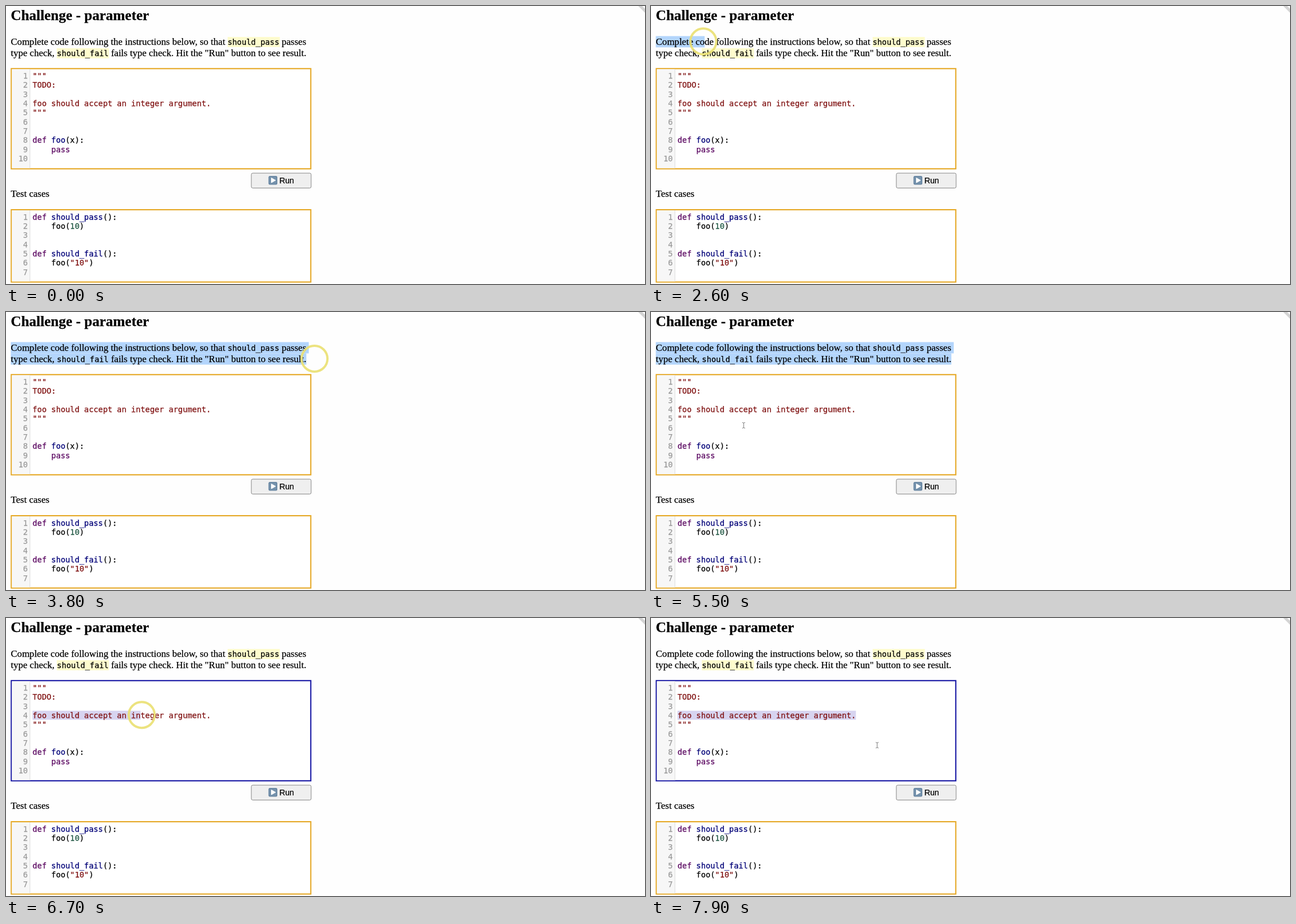
An HTML page for the animation above (8000 ms loop, 1133 by 494 pixels).

```html
<!DOCTYPE html>
<html lang="en">
<head>
<meta charset="utf-8">
<title>Challenge - parameter</title>
<style>
  html, body { margin: 0; width: 100%; height: 100%; overflow: hidden; background: #fefefe; }
  svg { display: block; width: 100%; height: 100%; }
  text {
    white-space: pre; font: 17.05px "Liberation Serif", serif;
    fill: currentColor; stroke: currentColor; stroke-width: .25px;
  }
  tspan { fill: currentColor; stroke: currentColor; }
  .title { font-size: 25.5px; font-weight: bold; }
  .code, .mono { font: 13.83px "DejaVu Sans Mono", monospace; }
  .num { color: #999; text-anchor: end; }
  .key { color: #5a0660; }
  .def { color: #000078; }
  .str { color: #7f1010; }
  .int { color: #1c5540; }
  .button { font: 14.2px "Liberation Sans", sans-serif; }
</style>
</head>
<body>
<svg viewBox="0 0 1133 494">
  <path d="M1121 0L1133 12V5L1128 0Z" fill="#d4d4d4"/>
  <text class="title" x="8.5" y="25.2">Challenge - parameter</text>
  <g fill="#fefccd">
    <rect x="393" y="55" width="92.5" height="18"/>
    <rect x="90" y="75" width="92.5" height="18"/>
  </g>
  <g fill="#b3d5fc">
    <rect id="selectTop" x="8.5" y="53.5" height="20"/>
    <rect id="selectBottom" x="8.5" y="73.5" height="20"/>
  </g>
  <text id="lineTop" x="8.5" y="68.6">Complete code following the instructions below, so that <tspan class="mono">should_pass</tspan> passes</text>
  <text id="lineBottom" x="8.5" y="88.6">type check, <tspan class="mono">should_fail</tspan> fails type check. Hit the "Run" button to see result.</text>

  <g id="solution"></g>

  <rect x="435" y="297" width="106" height="26.5" rx="2.5" fill="#efefef" stroke="#858585"/>
  <rect x="465.5" y="302" width="15.5" height="15.5" rx="2.5" fill="#5d7d9b"/>
  <rect x="466.5" y="303" width="13.5" height="13.5" rx="2" fill="#7592ac"/>
  <path d="M470.5 305.5V314L478 309.75Z" fill="#fff" stroke="#fff" stroke-linejoin="round"/>
  <text class="button" x="484.7" y="315">Run</text>
  <text x="8.5" y="339">Test cases</text>

  <g id="tests"></g>

  <path id="beam" d="M-2.5 -5Q0 -5 0 -3.5Q0 -5 2.5 -5M0 -3.5V3.5M-2.5 5Q0 5 0 3.5Q0 5 2.5 5" fill="none" stroke="#777"/>
  <circle id="ring" r="23" fill="none" stroke="#ebe176" stroke-width="4" opacity=".93"/>
</svg>
<script>
const LOOP = 8000, STEP = 100;
const ENTER = 300, PARA_PRESS = 2300, PARA_RELEASE = 4200, CODE_PRESS = 6300, CODE_RELEASE = 7700;
const LEFT = 8.5, CODE_X = 47, ROW = 16.33;
const IDLE = '#e5a722', FOCUSED = '#1111a2';
const $ = id => document.getElementById(id);
const span = (kind, text) => `<tspan class="${kind}">${text}</tspan>`;
const def = (name, args) => `${span('key', 'def')} ${span('def', name)}(${args}):`;

function drawEditor(id, top, height, rows) {
  const lines = rows.map((row, i) => {
    const y = top + 18.7 + i * ROW;
    return `<text class="code num" x="38.6" y="${y}">${i + 1}</text>
      <text class="code" x="${CODE_X}" y="${y}">${row}</text>`;
  });
  $(id).innerHTML = `
    <rect class="frame" x="9.4" y="${top + 1}" width="531" height="${height - 2}" fill="#fff" stroke="${IDLE}" stroke-width="2.1"/>
    <rect x="10.5" y="${top + 2}" width="32" height="${height - 4}" fill="#f7f7f7"/>
    <rect x="42" y="${top + 2}" width="1" height="${height - 4}" fill="#ddd"/>
    <rect class="selection" x="${CODE_X}" y="${top + 5.5 + 3 * ROW}" width="0" height="16" fill="#d7d4f0"/>
    ${lines.join('')}`;
}

drawEditor('solution', 110.3, 180, [
  span('str', '"""'), span('str', 'TODO:'), '',
  span('str', 'foo should accept an integer argument.'), span('str', '"""'),
  '', '', def('foo', 'x'), '    ' + span('key', 'pass'), ''
]);
drawEditor('tests', 361, 130.5, [
  def('should_pass', ''), `    foo(${span('int', '10')})`, '', '',
  def('should_fail', ''), `    foo(${span('str', '"10"')})`, ''
]);

const frame = document.querySelector('#solution .frame');
const codeSelection = document.querySelector('#solution .selection');
const todoLine = document.querySelectorAll('#solution .code:not(.num)')[3];

const smooth = k => k * k * (3 - 2 * k);
const slowDown = k => 1 - (1 - k) ** 2;

// Each move starts where the previous one ended; bend delays the vertical part.
const entry = { x: 519, y: 488 };
const moves = [
  { from: ENTER, to: 1350, x: 72, y: 181, ease: slowDown },
  { from: 1700, to: 2200, x: 10, y: 63, ease: smooth },
  { from: 2280, to: 3570, x: 547, y: 83, ease: smooth, bend: 4 },
  { from: PARA_RELEASE - STEP, to: 5000, x: 171, y: 203, ease: smooth },
  { from: 5400, to: 6100, x: 50, y: 174, ease: smooth },
  { from: 6365, to: 7300, x: 374, y: 171, ease: slowDown },
  { from: CODE_RELEASE - STEP, to: 7900, x: 401, y: 226, ease: smooth }
];

function pointerAt(t) {
  let { x, y } = entry;
  for (const move of moves) {
    const k = move.ease(Math.min(1, Math.max(0, (t - move.from) / (move.to - move.from))));
    x += (move.x - x) * k;
    y += (move.y - y) * k ** (move.bend || 1);
  }
  return { x, y };
}

// Selections end at the letter edge nearest to the pointer.
function edgesOf(text) {
  const edges = [text.getStartPositionOfChar(0).x];
  for (let i = 0; i < text.getNumberOfChars(); i++) edges.push(text.getEndPositionOfChar(i).x);
  return edges;
}
const nearest = (edges, x) => edges.reduce((a, b) => Math.abs(b - x) < Math.abs(a - x) ? b : a);
const topEdges = edgesOf($('lineTop')), bottomEdges = edgesOf($('lineBottom')), codeEdges = edgesOf(todoLine);
const setWidth = (rect, width) => rect.setAttribute('width', Math.max(0, width));

function draw(t) {
  const { x, y } = pointerAt(t);
  const pressed = t >= PARA_PRESS && t < PARA_RELEASE || t >= CODE_PRESS && t < CODE_RELEASE;
  for (const id of ['ring', 'beam']) $(id).setAttribute('transform', `translate(${x} ${y})`);
  $('ring').style.display = pressed ? '' : 'none';
  $('beam').style.display = pressed || t < ENTER ? 'none' : '';

  let topWidth = 0, bottomWidth = 0;
  if (t >= PARA_PRESS && t < CODE_PRESS) {
    const drag = pointerAt(Math.min(t, PARA_RELEASE - STEP));
    const onSecondLine = drag.y > 73.5;
    topWidth = onSecondLine ? 528.3 : nearest(topEdges, drag.x) - LEFT;
    bottomWidth = onSecondLine ? nearest(bottomEdges, drag.x) - LEFT : 0;
  }
  setWidth($('selectTop'), topWidth);
  setWidth($('selectBottom'), bottomWidth);

  const focused = t >= CODE_PRESS;
  frame.setAttribute('stroke', focused ? FOCUSED : IDLE);
  const drag = pointerAt(Math.min(t, CODE_RELEASE - STEP));
  setWidth(codeSelection, focused ? nearest(codeEdges, drag.x) - CODE_X : 0);
}

const start = performance.now();
function tick() {
  const elapsed = (performance.now() - start) % LOOP;
  draw(Math.floor(elapsed / STEP) * STEP);
  requestAnimationFrame(tick);
}
tick();
</script>
</body>
</html>
```
